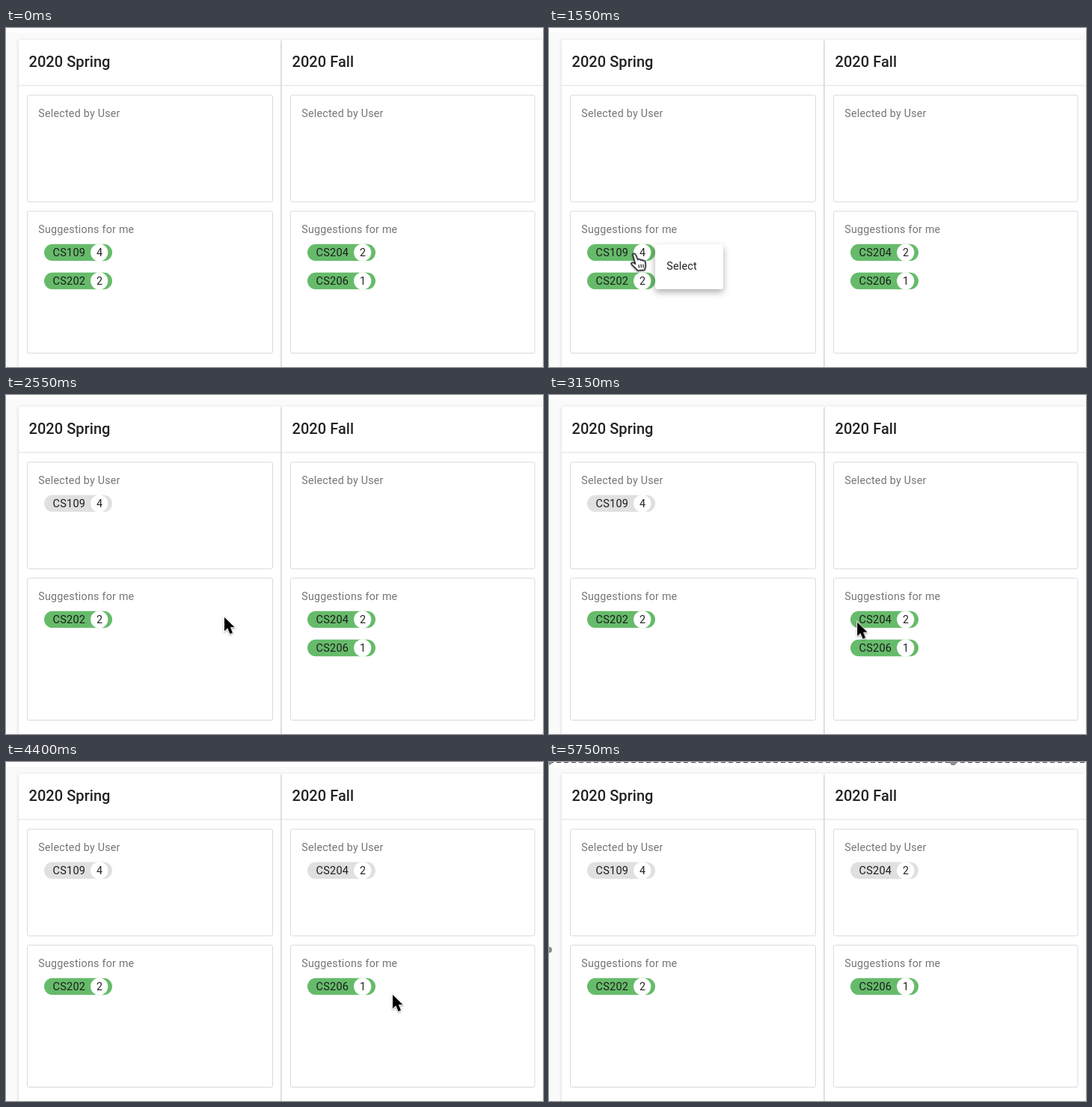
An HTML page for the animation above (5.8 s loop, 718x453 px).

```html
<!DOCTYPE html>
<html lang="en">
<head>
<meta charset="utf-8">
<title>Course planner</title>
<style>
html, body { margin: 0; width: 100%; height: 100%; overflow: hidden; background: #fff; }
svg { display: block; width: 718px; height: 453px; }
text { font: 400 14.25px Roboto, sans-serif; letter-spacing: .25px; fill: #222; }
.title { font-size: 20px; font-weight: 500; letter-spacing: .05px; }
.label { fill: #757575; }
.code { font-size: 14.5px; fill: #1c1c1c; }
.count { text-anchor: middle; letter-spacing: 0; }
.card { fill: #fff; filter: drop-shadow(0 1px 2px rgba(0, 0, 0, .16)); }
.rule { stroke: #dcdfdc; }
.box { fill: #fff; stroke: #d9d9e0; }
.green { fill: #66bb6a; }
.grey { fill: #e0e0e0; }

/* one shared clock of 5.8 s */
.anim, .menu, .hover, .ripple, #cursor, #hand, #arrow, #frame {
  animation: 5.8s linear infinite;
}
.anim { animation-timing-function: step-end; }
.first.before { animation-name: hide1; }
.first.after { animation-name: show1; }
.second.before { animation-name: hide2; }
.second.after { animation-name: show2; }
.first.rise { animation-name: rise1; }
.second.rise { animation-name: rise2; }
@keyframes hide1 { 0% { opacity: 1 } 37%, 100% { opacity: 0 } }
@keyframes show1 { 0% { opacity: 0 } 37%, 100% { opacity: 1 } }
@keyframes hide2 { 0% { opacity: 1 } 72.5%, 100% { opacity: 0 } }
@keyframes show2 { 0% { opacity: 0 } 72.5%, 100% { opacity: 1 } }
@keyframes rise1 { 0% { transform: translateY(38px) } 37%, 100% { transform: none } }
@keyframes rise2 { 0% { transform: translateY(38px) } 72.5%, 100% { transform: none } }

.menu { filter: drop-shadow(0 4px 5px rgba(0, 0, 0, .32)); }
.first.menu { animation-name: menu1; }
.second.menu { animation-name: menu2; }
@keyframes menu1 {
  0%, 20.6% { opacity: 0; transform: scale(.3) }
  22.6%, 37% { opacity: 1; transform: none }
  38.5%, 100% { opacity: 0; transform: none }
}
@keyframes menu2 {
  0%, 57.5% { opacity: 0; transform: scale(.3) }
  59.5%, 72.5% { opacity: 1; transform: none }
  74%, 100% { opacity: 0; transform: none }
}
.hover { fill: #000; animation-timing-function: step-end; }
.first .hover { animation-name: hover1; }
.second .hover { animation-name: hover2; }
@keyframes hover1 { 0% { opacity: 0 } 28.5% { opacity: .12 } 38.5%, 100% { opacity: 0 } }
@keyframes hover2 { 0% { opacity: 0 } 67.5% { opacity: .12 } 74%, 100% { opacity: 0 } }
.ripple { fill: #000; fill-opacity: .2; }
.first .ripple { animation-name: ripple1; }
.second .ripple { animation-name: ripple2; }
@keyframes ripple1 {
  0%, 31.5% { transform: scale(0); opacity: 1 }
  33.6% { transform: scale(.65); opacity: 1 }
  35%, 37% { transform: none; opacity: 1 }
  38.5%, 100% { transform: none; opacity: 0 }
}
@keyframes ripple2 {
  0%, 70% { transform: scale(0); opacity: 1 }
  72%, 72.5% { transform: none; opacity: 1 }
  74%, 100% { transform: none; opacity: 0 }
}

#cursor { animation-name: roam; animation-timing-function: ease-in-out; }
@keyframes roam {
  0%, 6% { transform: translate(190px, 475px) }
  14%, 24% { transform: translate(87px, 295px) }
  31%, 36.2% { transform: translate(171px, 313px) }
  43%, 45% { transform: translate(292px, 297px) }
  56%, 64% { transform: translate(418px, 304px) }
  70%, 72.5% { transform: translate(526px, 316px) }
  75%, 79% { transform: translate(517px, 311px) }
  90%, 100% { transform: translate(640px, -40px) }
}
#hand, #arrow { animation-timing-function: step-end; filter: drop-shadow(0 1px 1px rgba(0, 0, 0, .35)); }
#hand { animation-name: point; }
#arrow { animation-name: rest; }
@keyframes point { 0% { opacity: 0 } 12.5% { opacity: 1 } 37% { opacity: 0 } 54.5% { opacity: 1 } 72.5%, 100% { opacity: 0 } }
@keyframes rest { 0% { opacity: 1 } 12.5% { opacity: 0 } 37% { opacity: 1 } 54.5% { opacity: 0 } 72.5%, 100% { opacity: 1 } }

#frame { animation-name: outline; animation-timing-function: step-end; }
@keyframes outline { 0% { opacity: 0 } 92.5%, 100% { opacity: 1 } }
</style>
</head>
<body>
<svg viewBox="0 0 718 453">
  <defs>
    <clipPath id="item"><rect y="6.5" width="91" height="46.5"/></clipPath>
  </defs>
  <path fill="#fafafa" d="M0 6H718V453H0z"/>
  <g id="columns"></g>
  <g id="menus"></g>
  <g id="frame">
    <path d="M0 .5H718" stroke="#484848" stroke-dasharray="6 4"/>
    <g fill="#8c8c8c">
      <circle cy="0" r="4"/><circle cx="540.5" r="4.5"/><circle cy="251" r="4"/>
    </g>
  </g>
  <g id="cursor">
    <path id="arrow" d="M0 0V18.5L4.3 14.6 7.5 22.3 11 20.8 7.9 13.3H13.5z"
      stroke="#fff" stroke-width="1.8" paint-order="stroke"/>
    <g id="hand">
      <path transform="translate(-7 -1)" fill="#fff" stroke="#111" stroke-width="1.5" stroke-linejoin="round"
        d="M5 3q1.5-3 4 0l3 7c1.5-1.5 3-1 3.5.5c1.5-1.2 3-.4 3.3.8c1.5-.8 2.8 0 3 1.3l.6 4.5c.2 3-1 4-1.4 6.5l-9.5.8c-1.5-3-5.5-5-8-8.5c-1-2 1-3 3-1.8l2.2 1.5z"/>
      <path transform="translate(-7 -1)" stroke="#111" stroke-width="1.2" d="M13 16.5l.7 4.5M16 16l.6 4.5M19 16l.4 4.5"/>
    </g>
  </g>
</svg>
<script>
const chip = (x, y, code, count, color, state) => `
  <g transform="translate(${x} ${y})"><g class="${state}">
    <rect class="${color}" width="91" height="22.6" rx="11.3"/>
    <circle cx="73.7" cy="11.3" r="11.6" fill="#fff"/>
    <text class="code" x="11.5" y="16.2">${code}</text>
    <text class="count" x="74" y="16.2">${count}</text>
  </g></g>`;

const column = (x, width, title, group, picked, other) => `
  <g transform="translate(${x} 0)">
    <rect class="card" x="17" y="15.5" width="${width + 22}" height="450"/>
    <path class="rule" d="M17 76.8h${width + 22}"/>
    <text class="title" x="30.5" y="52">${title}</text>
    <rect class="box" x="28.5" y="89.8" width="${width}" height="142.4" rx="2"/>
    <rect class="box" x="28.5" y="244.8" width="${width}" height="189.7" rx="2"/>
    <text class="label" x="43.2" y="119.3">Selected by User</text>
    <text class="label" x="43.2" y="274.3">Suggestions for me</text>
    ${chip(51, 133.7, ...picked, "grey", `anim ${group} after`)}
    ${chip(51, 288.7, ...picked, "green", `anim ${group} before`)}
    ${chip(51, 288.7, ...other, "green", `anim ${group} rise`)}
  </g>`;

const menu = (x, group, press) => `
  <g transform="translate(${x} 289)"><g class="menu ${group}">
    <rect width="91" height="60" rx="3" fill="#fff"/>
    <g clip-path="url(#item)">
      <rect class="hover" y="6.5" width="91" height="46.5"/>
      <g transform="translate(${press} 29)"><circle class="ripple" r="100"/></g>
    </g>
    <text x="15.3" y="34.2">Select</text>
  </g></g>`;

document.getElementById("columns").innerHTML =
  column(0, 328, "2020 Spring", "first", ["CS109", 4], ["CS202", 2]) +
  column(352, 326.5, "2020 Fall", "second", ["CS204", 2], ["CS206", 1]);
document.getElementById("menus").innerHTML = menu(142, "first", 29) + menu(493, "second", 33);
</script>
</body>
</html>
```
